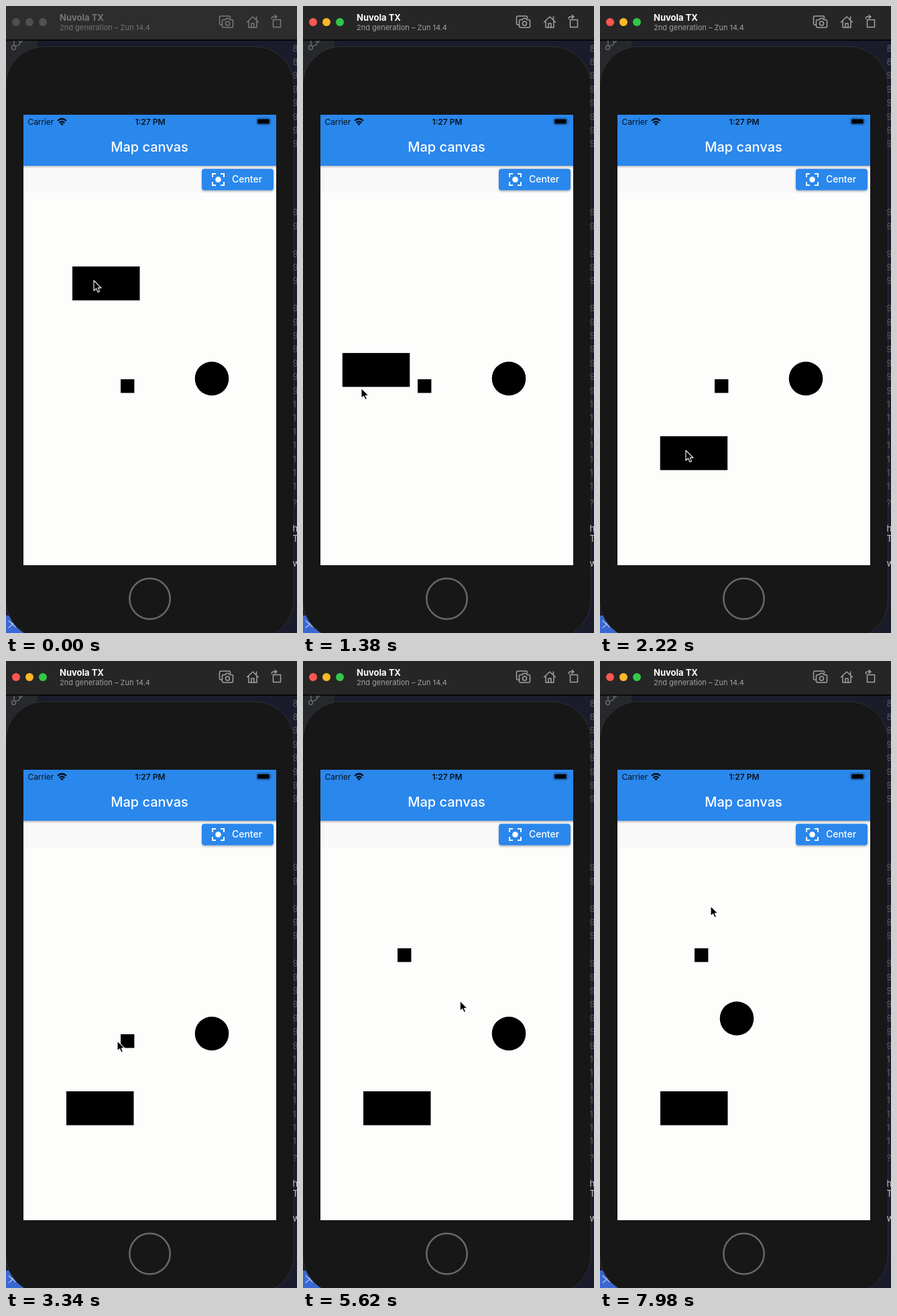
Animation of 434 by 934 pixels, one loop 8 s. Source, as an HTML page:

```html
<!DOCTYPE html>
<html lang="en">
<head>
<meta charset="utf-8">
<title>Map canvas</title>
<style>
  html, body { margin: 0; width: 100%; height: 100%; overflow: hidden; background: #171717; }
  svg { display: block; width: 100vw; height: 100vh; }
  text { font-family: Inter, "Open Sans", sans-serif; }
  .line { fill: none; stroke-linecap: round; stroke-linejoin: round; }
  #window { --bar: #2d2d2e; --title: #747474; --sub: #747474; --icon: #7b7b7b; --red: #505050; --amber: #505050; --green: #505050; }
  #window.active { --bar: #262626; --title: #fff; --sub: #a0a0a0; --icon: #a3a3a3; --red: #fc5750; --amber: #fdb827; --green: #33c748; }
</style>
</head>
<body>
<svg viewBox="0 0 434 934" preserveAspectRatio="none">
  <defs>
    <filter id="shadow" x="-10%" y="-20%" width="120%" height="150%">
      <feDropShadow dx="0" dy="1.5" stdDeviation="1.5" flood-color="#000" flood-opacity=".3"/>
    </filter>
    <clipPath id="screen"><rect x="26" y="162" width="377" height="671"/></clipPath>
  </defs>

  <!-- Editor behind the device -->
  <rect width="434" height="934" fill="#1a1c2c"/>
  <rect y="51" width="47" height="60" fill="#26282c"/>
  <g class="line" stroke="#6a6c70" stroke-width="1.4">
    <circle cx="11.5" cy="62" r="3"/><path d="M12 59V51M14 60Q21 59 21 54"/><circle cx="22" cy="52" r="2"/>
  </g>
  <rect y="908" width="32" height="26" fill="#3a68d2"/>
  <path class="line" d="M4 916l6 5-6 5M14 915l-5 5 5 5" stroke="#b4c4ea" stroke-width="1.2"/>

  <!-- Device -->
  <rect x="-.5" y="60.5" width="430" height="882" rx="58" fill="#171717" stroke="#303030"/>
  <g id="gutter" font-size="13" fill="#5a5c62"></g>
  <circle class="line" cx="214.5" cy="883" r="30.2" stroke="#686868" stroke-width="2.5"/>

  <!-- Simulator title bar -->
  <g id="window">
    <rect width="434" height="50" fill="var(--bar)"/>
    <rect y="50" width="434" height="1.500" fill="#000"/>
    <circle cx="15" cy="24" r="6" fill="var(--red)"/>
    <circle cx="35" cy="24" r="6" fill="var(--amber)"/>
    <circle cx="55" cy="24" r="6" fill="var(--green)"/>
    <text x="80" y="22" font-size="13" font-weight="700" fill="var(--title)">Nuvola TX</text>
    <text x="80" y="36" font-size="11" fill="var(--sub)">2nd generation – Zun 14.4</text>
    <g class="line" stroke="var(--icon)" stroke-width="1.5">
      <path d="M322 28h-1.500q-2 0-2-2v-9q0-2 2-2h12q2 0 2 2v1"/>
      <path d="M324.500 20.500h2.500l1.500-2h4l1.500 2h2.500q2 0 2 2v7.500q0 2-2 2h-12q-2 0-2-2v-7.500q0-2 2-2z"/>
      <circle cx="330.500" cy="26" r="3"/>
      <path d="M359.500 24l8.500-8 8.500 8M362 23v9h12v-9M366 32v-6h4v6M373.500 20v-4"/>
      <path d="M398.500 20.500h11v11h-11zM396.500 19v-1q0-2 2-2h5M401 13.500l3 2.500-3 2.500"/>
    </g>
  </g>

  <!-- App -->
  <g clip-path="url(#screen)">
    <rect x="26" y="162" width="377" height="671" fill="#fdfdfc"/>
    <rect x="26" y="238" width="377" height="40" fill="#f9f9fa"/>
    <rect x="22" y="158" width="385" height="80" fill="#2c87ec" filter="url(#shadow)"/>
    <text x="32.5" y="177" font-size="12" letter-spacing="-.1" fill="#08131a">Carrier</text>
    <path class="line" d="M77 171q6.500-6 13 0M79.500 174q4-3.800 8 0" stroke="#050b0e" stroke-width="2.2" style="stroke-linecap:butt"/>
    <path d="M83.500 178l-2.500-2.500q2.500-2 5 0z" fill="#050b0e"/>
    <text x="215" y="177" font-size="12" font-weight="600" text-anchor="middle" fill="#08131a">1:27 PM</text>
    <rect x="373.5" y="167" width="21" height="10" rx="3" fill="none" stroke="#1b5290"/>
    <rect x="375" y="168.5" width="18" height="7" rx="1.5"/>
    <path d="M396 170v4q1.500-2 0-4z" fill="#1b5290"/>
    <text x="214" y="217" font-size="20" font-weight="500" text-anchor="middle" fill="#fff">Map canvas</text>
    <rect x="292" y="242.5" width="107" height="32" rx="4" fill="#2c87ec" filter="url(#shadow)"/>
    <path d="M308 255v-5h5M320 250h5v5M325 262v5h-5M313 267h-5v-5" fill="none" stroke="#fff" stroke-width="2"/>
    <circle cx="316.5" cy="258.5" r="4.3" fill="#fff"/>
    <text x="359.5" y="263.3" font-size="14" font-weight="500" text-anchor="middle" fill="#fff">Center</text>

    <rect id="box" x="99" y="388" width="100.5" height="50.5"/>
    <rect id="square" x="171" y="556" width="20.4" height="20.4"/>
    <circle id="disc" cx="307" cy="555" r="25.3"/>
  </g>
  <path id="cursor" d="M0 0V15L3.500 11.800 6 17.200 8.500 16.100 6.200 10.900H11z" stroke="#fff" stroke-width="1.1" stroke-linejoin="round"/>
</svg>

<script>
const LOOP = 8000, ACTIVATE = 400, LAG = 100;
const $ = id => document.getElementById(id);

// Pointer path: where it grabs, turns and lets go
const path = [
  { t: 0, x: 131, y: 409 }, { t: 750, x: 137, y: 409 },
  { t: 1380, x: 87, y: 569 }, { t: 1500, x: 74, y: 610 }, { t: 2150, x: 128, y: 662 },
  { t: 2500, x: 128, y: 662 }, { t: 3340, x: 166, y: 566 }, { t: 3700, x: 167, y: 561 },
  { t: 4500, x: 142, y: 441 }, { t: 4600, x: 137, y: 433 },
  { t: 5000, x: 137, y: 433 }, { t: 6100, x: 300, y: 556 },
  { t: 6600, x: 217, y: 537 }, { t: 6750, x: 197, y: 533.5 },
  { t: 7200, x: 197, y: 533.5 }, { t: 7980, x: 165, y: 365 }
];
// Each shape follows the pointer between grab and drop.
const drags = [
  { id: "box", grab: 750, drop: 2150 },
  { id: "square", grab: 3700, drop: 4600 },
  { id: "disc", grab: 6100, drop: 6750 }
];

const clamp = (value, low, high) => Math.min(high, Math.max(low, value));

// Monotone cubic interpolation keeps holds still and turns smooth.
function along(axis, t) {
  const i = clamp(path.findIndex(p => p.t > t) - 1, 0, path.length - 2);
  const rate = k => (path[k + 1][axis] - path[k][axis]) / (path[k + 1].t - path[k].t);
  const slope = k => {
    if (k === 0 || k === path.length - 1) return 0;
    const a = rate(k - 1), b = rate(k);
    return a * b > 0 ? 2 * a * b / (a + b) : 0;
  };
  const from = path[i], to = path[i + 1], span = to.t - from.t, u = (t - from.t) / span;
  return from[axis] + (to[axis] - from[axis]) * u * u * (3 - 2 * u)
    + span * u * (1 - u) * ((1 - u) * slope(i) - u * slope(i + 1));
}
const pointer = t => {
  const time = Math.min(t, path[path.length - 1].t - 1);
  return { x: along("x", time), y: along("y", time) };
};
const move = (id, x, y) => $(id).setAttribute("transform", `translate(${x} ${y})`);

function label(y, glyph, fill) {
  const node = document.createElementNS($("gutter").namespaceURI, "text");
  node.setAttribute("x", 427.5);
  node.setAttribute("y", y + 4.5);
  if (fill) node.setAttribute("fill", fill);
  node.textContent = glyph;
  $("gutter").append(node);
}
for (let row = 0; row < 33; row++) {
  const blank = row > 7 && row < 20 && (row < 12 || row % 4 === 2);
  if (!blank) label(63 + row * 20.4, row < 2 ? "8" : row < 26 ? "9" : "1");
}
label(740, "?");
label(778, "h", "#c4c4c4");
label(793, "T", "#c4c4c4");
label(830, "w", "#c4c4c4");

function draw(now) {
  const t = Math.max(0, now - start) % LOOP;
  const tip = pointer(t);
  move("cursor", tip.x, tip.y);
  for (const { id, grab, drop } of drags) {
    const held = pointer(grab), hand = pointer(clamp(t - LAG, grab, drop));
    move(id, hand.x - held.x, hand.y - held.y);
  }
  $("window").classList.toggle("active", t >= ACTIVATE);
  requestAnimationFrame(draw);
}
const start = performance.now();
draw(start);
</script>
</body>
</html>
```
